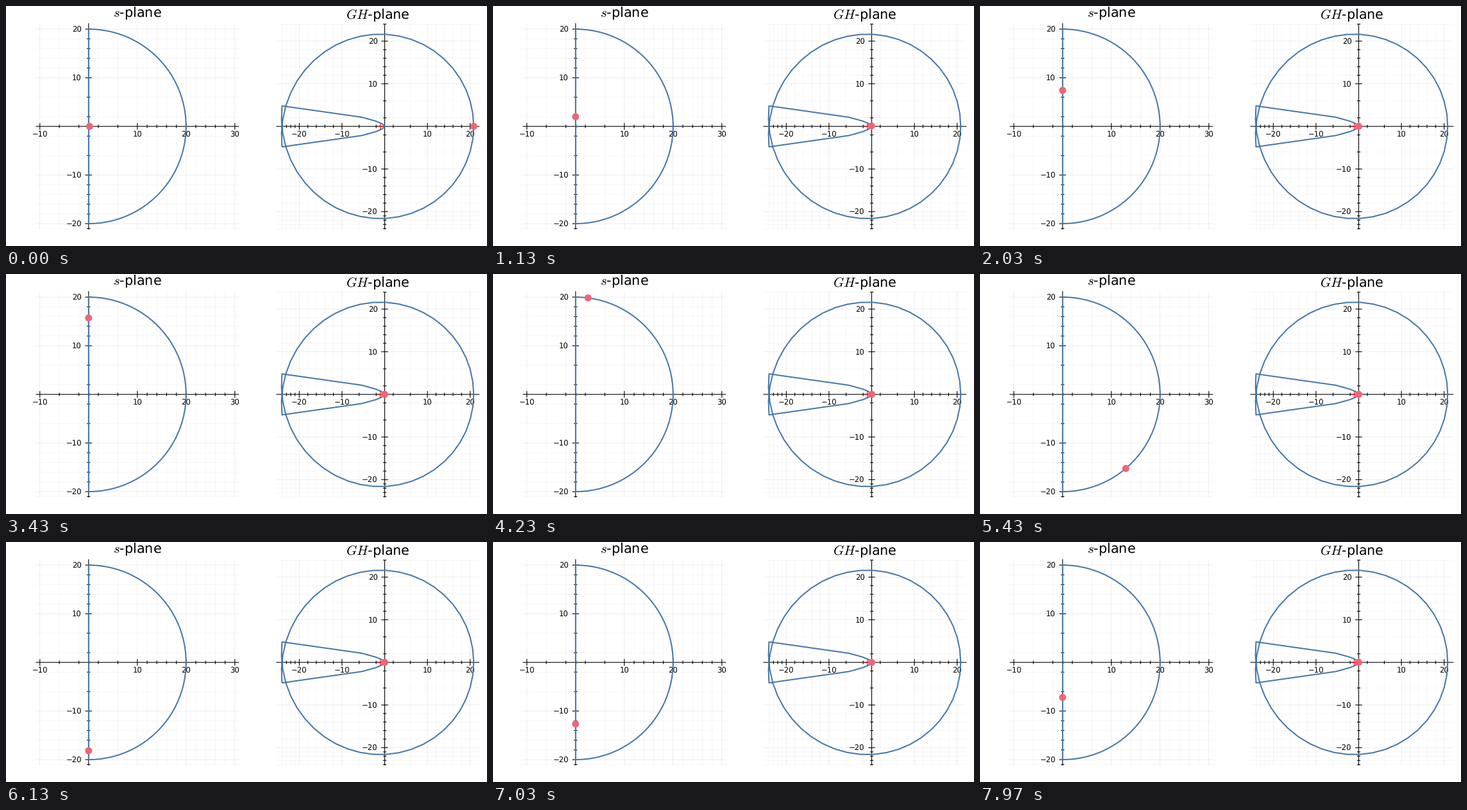
Recreate the animation shown at these times as a matplotlib script. Size 750 by 375 pixels, loop 8 s.

```python
import matplotlib.pyplot as plt
import numpy as np
from matplotlib.animation import FuncAnimation
from matplotlib.collections import LineCollection
from matplotlib.patches import Circle

W, H, DPI = 750, 375, 100
PX = 72 / DPI  # points per pixel
FRAMES, LOOP = 400, 8000
BLUE, PINK = "#4477aa", "#ee6677"
R, EPS = 20, 0.2

plt.rcParams.update({"font.family": "DejaVu Sans", "mathtext.fontset": "cm",
                     "text.hinting": "none"})


def contour():
    """Nyquist contour, starting on the small arc around the origin."""
    def arc(radius, a, b, n):
        return radius * np.exp(1j * np.radians(np.linspace(a, b, n)))

    def axis(a, b):
        return 1j * np.linspace(a, b, 50)

    return np.concatenate([
        arc(EPS, 0, 90, 25), axis(EPS, R / 2), axis(R / 2, R),
        arc(R, 90, -90, 50),
        axis(-R, -R / 2), axis(-R / 2, -EPS), arc(EPS, -90, 0, 25)])


def minor_ticks(ticks):
    """Four ticks inside each gap, with the outer gaps extrapolated."""
    d = np.diff(ticks)
    ratio = d[1] / d[0]
    ext = [ticks[0] - d[0] / ratio, *ticks, ticks[-1] + d[-1] * ratio]
    return [a + (b - a) * k / 5
            for a, b in zip(ext, ext[1:]) for k in range(1, 5)]


class Plane:
    def __init__(self, ax, origin, scale, box, xticks, yticks):
        self.ax, self.origin, self.scale, self.box = ax, origin, scale, box
        x0, x1, y0, y1 = box
        ox, oy = origin
        self.ticks(minor_ticks(xticks), minor_ticks(yticks), 0.05, 2.6)
        self.ticks(xticks, yticks, 0.1, 5.2)
        self.lines([[(x0, oy), (x1, oy)], [(ox, y0), (ox, y1)]],
                   "black", 1.1, 2)
        for v in xticks:
            self.label(ox + v * scale, oy + 17, v, "center", "baseline")
        for v in yticks:
            self.label(ox - 11, oy - v * scale + 0.3, v, "right",
                       "center_baseline")

    def lines(self, segments, color, width, z, alpha=1):
        self.ax.add_collection(LineCollection(
            segments, colors=color, linewidths=width * PX, alpha=alpha,
            zorder=z, snap=False))

    def ticks(self, xticks, yticks, alpha, size):
        x0, x1, y0, y1 = self.box
        ox, oy = self.origin
        xs = [x for x in (ox + v * self.scale for v in xticks)
              if x0 <= x <= x1]
        ys = [y for y in (oy - v * self.scale for v in yticks)
              if y0 <= y <= y1]
        grid = ([[(x, y0), (x, y1)] for x in xs]
                + [[(x0, y), (x1, y)] for y in ys])
        marks = ([[(x, oy - size), (x, oy + size)] for x in xs]
                 + [[(ox - size, y), (ox + size, y)] for y in ys])
        self.lines(grid, "black", 0.65, 1, alpha)
        self.lines(marks, "black", 1.1, 2)

    def label(self, x, y, v, ha, va):
        self.ax.text(x, y, str(v).replace("-", "\u2212"), ha=ha, va=va,
                     fontsize=11.67 * PX, zorder=3)

    def title(self, text, y):
        self.ax.text((self.box[0] + self.box[1]) / 2, y, text, ha="center",
                     va="baseline", fontsize=20.8 * PX)

    def pos(self, z):
        return (self.origin[0] + z.real * self.scale,
                self.origin[1] - z.imag * self.scale)

    def curve(self, z):
        self.ax.plot(*self.pos(z), color=BLUE, lw=2 * PX, zorder=4,
                     snap=False)

    def cross(self, z, r):
        x, y = self.pos(z)
        self.lines([[(x - r, y), (x + r, y)], [(x, y - r), (x, y + r)]],
                   "red", 1.1, 5)

    def dot(self):
        return self.ax.add_patch(
            Circle(self.origin, 5.5, fc=PINK, ec="none", zorder=6))


fig = plt.figure(figsize=(W / DPI, H / DPI), dpi=DPI, facecolor="white")
ax = fig.add_axes([0, 0, 1, 1])
ax.set_xlim(0, W)
ax.set_ylim(H, 0)
ax.axis("off")

s = contour()
gh = 1 / (s ** 2 * (s + 1))

left = Plane(ax, (128.8, 188.1), 7.6, (46.4, 363.2, 27, 349.2),
             [-10, 10, 20, 30], [-20, -10, 10, 20])
left.title("$s$-plane", 18)
left.curve(s)

right = Plane(ax, (590.5, 188.1), 6.66, (421.4, 738.2, 28, 349),
              [-20, -10, 10, 20], [-20, -10, 10, 20])
right.title("$GH$-plane", 20.7)
right.curve(gh)
right.cross(-1 + 0j, 5)

dots = left.dot(), right.dot()


def update(i):
    k = (3 * i + 2) // 5  # 30 contour points per second
    dots[0].center = left.pos(s[k])
    dots[1].center = right.pos(gh[k])
    return dots


anim = FuncAnimation(fig, update, frames=FRAMES, interval=LOOP / FRAMES,
                     repeat=True, repeat_delay=0)
plt.show()
```
